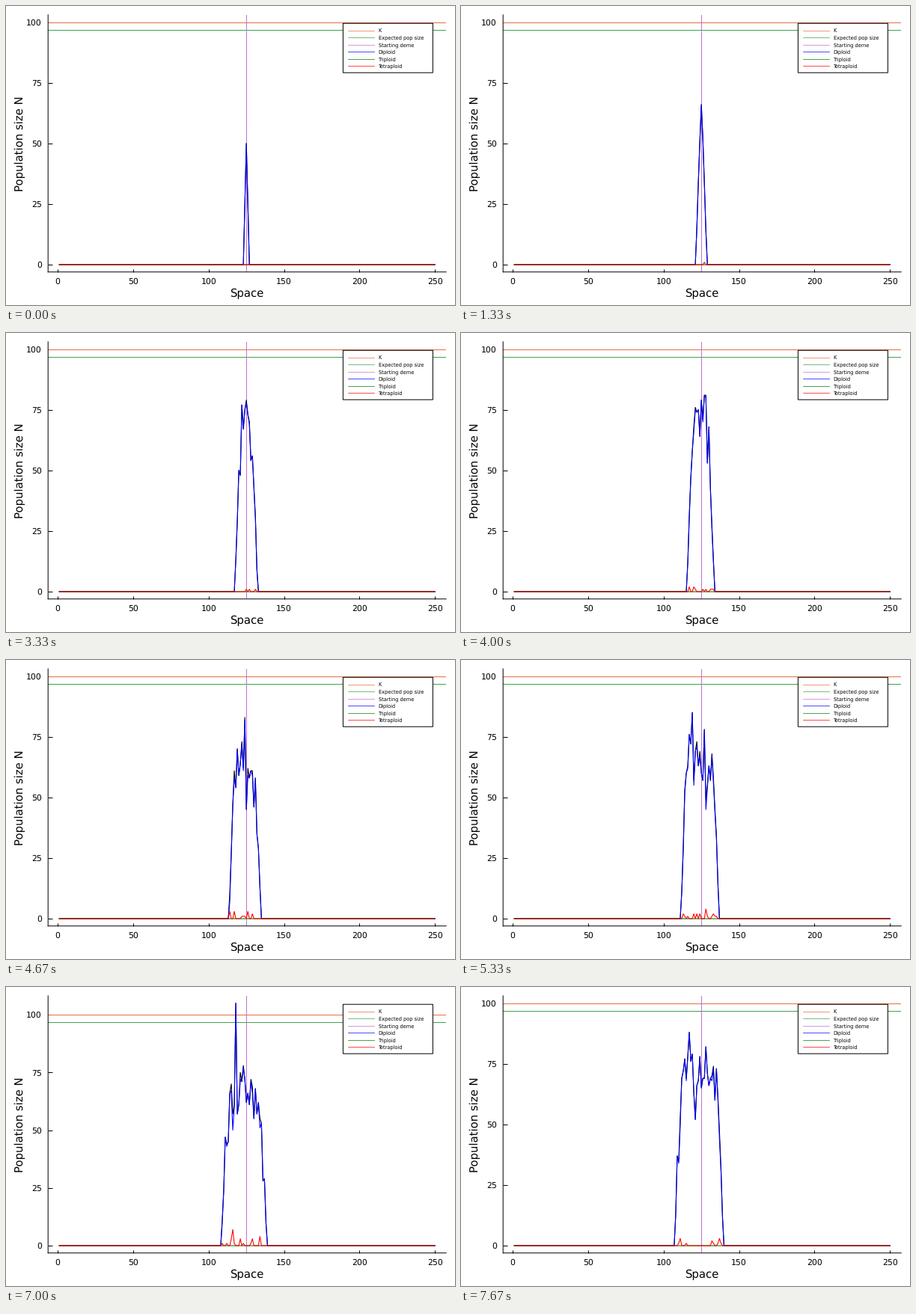
These frames come from a looping animation (600x400 px, 8000 ms). A matplotlib script:

```python
import numpy as np
import matplotlib.pyplot as plt
from matplotlib.animation import FuncAnimation
from matplotlib.patches import Rectangle

W, H, DPI = 600, 400, 100
PX = 72 / DPI
LOOP, STEP, COUNT = 8000, 40, 24
CAPACITY, EXPECTED, START = 100, 96.7, 125
ORANGE, GREEN, PURPLE = "#e26f46", "#3da44d", "#c371d2"
SPACE = np.arange(1, 251)

plt.rcParams.update({
    "font.family": "DejaVu Sans",
    "text.hinting": "no_hinting",
    "axes.linewidth": PX,
})


def generation(n):
    """Total and tetraploid population per deme in generation n."""
    rng = np.random.default_rng(n + 40)

    # Empty demes just outside the two wave fronts
    left = int(np.interp(n, [0, 8, 16, 23], [123, 119, 111, 107]))
    right = int(np.interp(n, [0, 16, 23], [127, 137, 140]))
    demes = np.arange(left + 1, right)

    # Fronts rise steeply at first, then flatten; the plateau turns noisy
    depth = np.minimum(demes - left, right - demes)
    width = min(1.75 + 0.3 * n, 3)
    shape = 1 - np.exp(-(depth / width) ** 1.5)
    shape *= 1 + rng.normal(0, min(0.0125 * n, 0.12), len(demes))
    shape *= (90 - 40 * np.exp(-n / 8)) / shape.max()

    # A short surge lifts the fullest deme above capacity
    shape[shape.argmax()] += 30 * np.exp(-((n - 20.5) / 0.7) ** 2)

    total, tetra = np.zeros((2, len(SPACE)))
    total[demes - 1] = np.round(shape).clip(1)
    rate = rng.gamma(0.6, min(n / 10, 1.2), len(demes))
    tetra[demes - 1] = rng.poisson(rate)
    return total, np.minimum(tetra, total)


GENERATIONS = [generation(n) for n in range(COUNT)]

fig = plt.figure(figsize=(W / DPI, H / DPI), dpi=DPI, facecolor="white")
ax = fig.add_axes([56.2 / W, 1 - 355.8 / H, 532 / W, 344 / H])
ax.spines[["top", "right"]].set_visible(False)
margin = 0.03 * 249
ax.set_xlim(1 - margin, 250 + margin)
ax.set_xticks(range(0, 251, 50))
ax.set_yticks(range(0, 101, 25))
ax.tick_params(direction="in", width=PX, labelsize=10.9 * PX)
ax.tick_params(axis="x", length=4.5 * PX, pad=7.2 * PX)
ax.tick_params(axis="y", length=6 * PX, pad=8.4 * PX)
for line in [*ax.spines.values(), *ax.get_xticklines(), *ax.get_yticklines()]:
    line.set_snap(False)

ax.axhline(CAPACITY, color=ORANGE, lw=PX)
ax.axhline(EXPECTED, color=GREEN, lw=PX)
ax.axvline(START, color=PURPLE, lw=PX)


def series(color):
    return ax.plot(SPACE, SPACE * 0, color=color, lw=1.1 * PX, snap=False)[0]


total_line = series("black")
diploid_line = series("blue")
triploid_line = series("green")
tetraploid_line = series("red")

# Pixel-based layer for labels and legend
page = fig.add_axes([0, 0, 1, 1], facecolor="none")
page.set_xlim(0, W)
page.set_ylim(H, 0)
page.axis("off")
page.text(322, 389, "Space", size=14.9 * PX, ha="center", va="baseline")
page.text(22.5, 184, "Population size N", size=14.9 * PX, rotation=90,
          rotation_mode="anchor", ha="center", va="baseline")

page.add_patch(Rectangle((450.4, 23.2), 120, 66, fc="white", ec="black",
                         lw=PX, snap=False))
LEGEND = {"K": ORANGE, "Expected pop size": GREEN, "Starting deme": PURPLE,
          "Diploid": "blue", "Triploid": "green", "Tetraploid": "red"}
for i, (name, color) in enumerate(LEGEND.items()):
    y = 32.8 + 9.45 * i
    page.plot([457, 492], [y, y], color=color, lw=0.7 * PX)
    page.text(497.5, y + 2.5, name, size=6.7 * PX, va="baseline")


def draw(frame):
    # Half a step and a little more, so each change falls on its nearest step
    n = int((frame * STEP + 30) * COUNT / LOOP)
    total, tetra = GENERATIONS[n]
    total_line.set_ydata(total)
    diploid_line.set_ydata(total - tetra)
    tetraploid_line.set_ydata(tetra)
    top = max(CAPACITY, total.max())
    ax.set_ylim(-0.03 * top, 1.03 * top)
    return total_line, diploid_line, triploid_line, tetraploid_line


anim = FuncAnimation(fig, draw, frames=LOOP // STEP, interval=STEP,
                     init_func=lambda: draw(0), repeat=True, repeat_delay=0,
                     blit=False)
plt.show()
```
